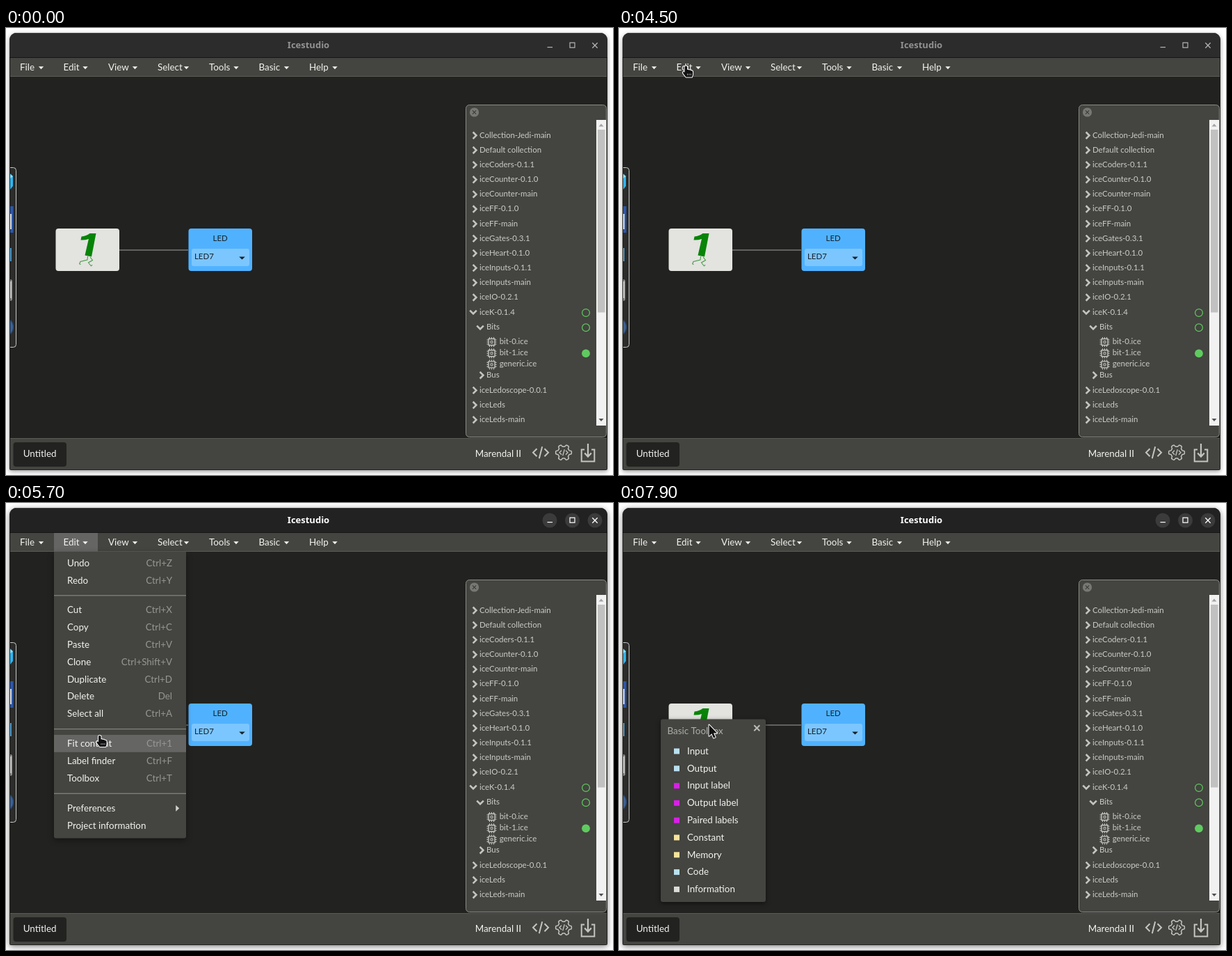
Write an HTML page with a canvas that moves like this. It is 873 px wide and 642 px high and loops after 8 s.

```html
<!DOCTYPE html>
<html lang="en">
<head>
<meta charset="utf-8">
<title>Icestudio</title>
<style>
html, body { margin: 0; width: 100%; height: 100%; overflow: hidden; background: #fff; }
canvas { display: block; }
</style>
</head>
<body>
<canvas id="stage" width="873" height="642"></canvas>
<script>
const ctx = document.getElementById('stage').getContext('2d');
const LOOP = 8000, STEP = 100, ROW = 24.8;
const PANEL = '#444440', DARK = '#222220', HOVER = '#656563', ICON = '#c4c4c0', GREEN = '#5fcb5f';
const FONT = 'Lato, "Open Sans", sans-serif';

// Drawing helpers
function rect(x, y, w, h, fill) {
  ctx.fillStyle = fill;
  ctx.fillRect(x, y, w, h);
}

function round(x, y, w, h, r, fill, stroke) {
  ctx.beginPath();
  ctx.roundRect(x, y, w, h, r);
  if (fill) { ctx.fillStyle = fill; ctx.fill(); }
  if (stroke) { ctx.strokeStyle = stroke; ctx.lineWidth = 1; ctx.stroke(); }
}

function shadowed(color, blur, dy, draw) {
  ctx.save();
  ctx.shadowColor = color;
  ctx.shadowBlur = blur;
  ctx.shadowOffsetY = dy;
  draw();
  ctx.restore();
}

function text(str, x, y, color = '#f2f2f0', size = 13.4, align = 'left') {
  ctx.font = `${size}px ${FONT}`;
  ctx.textAlign = align;
  ctx.fillStyle = color;
  ctx.fillText(str, x, y + size * 0.36);
}

function circle(x, y, r, fill, stroke, width = 1.2) {
  ctx.beginPath();
  ctx.arc(x, y, r, 0, Math.PI * 2);
  if (fill) { ctx.fillStyle = fill; ctx.fill(); }
  if (stroke) { ctx.strokeStyle = stroke; ctx.lineWidth = width; ctx.stroke(); }
}

function path(d, x, y, fill, stroke, width = 1) {
  const p = new Path2D(d);
  ctx.save();
  ctx.translate(x, y);
  ctx.lineWidth = width;
  if (stroke) { ctx.strokeStyle = stroke; ctx.stroke(p); }
  if (fill) { ctx.fillStyle = fill; ctx.fill(p); }
  ctx.restore();
}

const caret = (x, y, color = '#f2f2f0', r = 3.7) =>
  path(`M${-r} -2H${r}L0 2Z`, x, y, color);
const cross = (x, y, r, color, width) =>
  path(`M${-r} ${-r}L${r} ${r}M${r} ${-r}L${-r} ${r}`, x, y, null, color, width);

// Content
const menuBar = [['File', 20, 50.5], ['Edit', 82.5, 114], ['View', 147, 185.5], ['Select', 218, 259.5],
  ['Tools', 292, 331], ['Basic', 363.5, 403.5], ['Help', 436, 473]];

const editGroups = [
  [86, ['Undo|Ctrl+Z', 'Redo|Ctrl+Y']],
  [153.6, ['Cut|Ctrl+X', 'Copy|Ctrl+C', 'Paste|Ctrl+V', 'Clone|Ctrl+Shift+V', 'Duplicate|Ctrl+D',
    'Delete|Del', 'Select all|Ctrl+A']],
  [345.4, ['Fit content|Ctrl+1', 'Label finder|Ctrl+F', 'Toolbox|Ctrl+T']],
  [438, ['Preferences|>', 'Project information|']]
];

const BLUE = '#b9e0ef', PINK = '#d81fe6', YELLOW = '#f8e39b';
const toolItems = [['Input', BLUE], ['Output', BLUE], ['Input label', PINK], ['Output label', PINK],
  ['Paired labels', PINK], ['Constant', YELLOW], ['Memory', YELLOW], ['Code', BLUE], ['Information', '#dcdcd8']];

const folders = ['Collection-Jedi-main', 'Default collection', 'iceCoders-0.1.1', 'iceCounter-0.1.0',
  'iceCounter-main', 'iceFF-0.1.0', 'iceFF-main', 'iceGates-0.3.1', 'iceHeart-0.1.0', 'iceInputs-0.1.1',
  'iceInputs-main', 'iceIO-0.2.1'];

// Pointer: time, x, y
const ARROW = 'M0 0V16.2L3.8 12.7L6.6 19L9.2 17.9L6.5 11.9H11.4Z';
const HAND = 'M-2 1.4Q-2 0 -.2 0Q1.6 0 1.6 1.6V5.4Q3.4 4.8 4.2 6Q6 5.4 6.9 6.7Q9.6 6.3 9.6 8.8V11.5' +
  'Q9.6 13.5 8.4 16H-.2L-4.3 10.6Q-5.2 8.6 -3.4 8.3L-2 9.3Z';
const track = [
  [1200, 268, 1], [1300, 272, 9], [1400, 279, 16], [1500, 286, 21], [1900, 286, 21],
  [2000, 285.5, 21.5], [2300, 285.5, 21.5], [2400, 290, 23], [2500, 282, 41], [2700, 242, 92],
  [2900, 202, 133.5], [3000, 191, 132], [3200, 171.5, 122], [3500, 150, 111], [3800, 122, 91],
  [4100, 102.5, 74.5], [4200, 100, 68], [4300, 98, 60], [4500, 96.5, 54.5], [4900, 96.5, 54.5],
  [5000, 98, 66], [5100, 102, 112], [5200, 107, 164], [5300, 112, 208.5], [5500, 124, 272],
  [5700, 135, 334], [5800, 137, 367], [5900, 139, 383.5], [6100, 142, 402], [6300, 142, 402],
  [6400, 138, 389], [7100, 138, 389], [7200, 139, 393], [7300, 139, 388], [7400, 138, 371],
  [7500, 136, 350], [7600, 133, 326], [7700, 131, 312.5], [7800, 131, 312.5], [7900, 129.5, 318.5]
];

function pointerAt(t) {
  if (t < track[0][0]) return null;
  let i = track.findIndex(k => k[0] > t);
  if (i < 0) i = track.length;
  const a = track[i - 1], b = track[i] || a;
  const f = b === a ? 0 : (t - a[0]) / (b[0] - a[0]);
  return { x: a[1] + (b[1] - a[1]) * f, y: a[2] + (b[2] - a[2]) * f };
}

function drawWindow(focused) {
  rect(0, 0, 873, 642, '#fff');
  shadowed(focused ? 'rgba(0,0,0,.5)' : 'rgba(0,0,0,.4)', focused ? 8 : 6, 2,
    () => round(5, 7, 860, 628, [10, 10, 2, 2], DARK));
  round(5, 7, 860, 36, [10, 10, 0, 0], focused ? '#222222' : '#2c2c2c');
  rect(14, 7, 842, 1, focused ? '#3a3a3a' : '#404040');
  const ink = focused ? '#fff' : '#929292';
  ctx.font = 'bold 13px "Noto Sans", "Open Sans", sans-serif';
  ctx.textAlign = 'center';
  ctx.fillStyle = ink;
  ctx.fillText('Icestudio', 435, 29.3);

  const control = focused ? '#fff' : '#b4b4b4';
  if (focused) [782, 814.5, 847].forEach(x => circle(x, 25, 10.5, '#3b3b3b'));
  rect(778.5, 27, 7.5, 1.2, control);
  path('M-3.5 -3.5H3.5V3.5H-3.5Z', 814.5, 24.7, null, control, 1.2);
  cross(847, 25, 3.7, control, 1.3);

  rect(5, 42, 860, 1, '#171717');
  rect(6, 43, 858, 26, PANEL);
  rect(6, 69, 858, 1, '#5b5b58');
}

function drawMenuBar(open) {
  if (open) rect(69, 43, 63, 27, HOVER);
  for (const [label, x, cx] of menuBar) {
    text(label, x, 56.3);
    caret(cx, 57.3);
  }
}

function drawSideTools() {
  ctx.save();
  ctx.beginPath();
  ctx.rect(6, 195, 12, 270);
  ctx.clip();
  round(-10, 200.5, 24.5, 258, 4, '#2c2c2a', '#c9c9c7');
  path('M0 0L4 4V18L0 23Z', 6, 209, '#2fb4ee');
  path('M0 1L4 4L0 7Z', 6, 209, '#8ee0ff');
  rect(6, 256, 4.5, 38, '#2c56a8');
  rect(6, 267, 1.8, 22, '#f0f4fa');
  rect(6, 316, 1.6, 19, '#5cb8f2');
  round(0, 361, 9, 31, 3, '#8e8e8c');
  rect(6, 364, 1.5, 24, '#e4e4e2');
  circle(-3, 429.5, 13.5, '#3d608f', '#294a76');
  ctx.restore();
}

function drawBlocks() {
  rect(163, 318.2, 99, 1.5, '#777775');
  round(71.5, 288, 91.5, 61, 4, '#e3e3e0');
  path('M0 9.5L1 4.5Q8 3.8 13 0H22L15.5 33.5L6 31.5L11.4 8Q6 10 0 9.5Z', 107.5, 295, '#078407');
  path('M117.5 328L117 333L107 335.5L105.5 339M121 329L124.5 333.5L118.5 337L122.5 342M105.5 339L107.5 339.5M122.5 342L124 340',
    0, 0, null, '#459b45', 1.1);
  round(262.5, 288, 91.5, 61, 4, '#50b2ff');
  text('LED', 308.2, 302.3, '#15202a', 11.45, 'center');
  round(267, 317, 83, 25, 3, '#7cc6ff');
  text('LED7', 271, 328.3, '#15202a', 11.45);
  caret(339.5, 330.6, '#15202a', 4.3);
}

const chevronRight = (x, y) => path('M-2.4 -4.8L2.4 0L-2.4 4.8', x, y, null, ICON, 2.6);
const chevronDown = (x, y) => path('M-4.8 -2.4L0 2.4L4.8 -2.4', x, y, null, ICON, 2.6);

function drawChip(x, y) {
  path('M-4.5 -4.5H4.5V4.5H-4.5Z', x, y, null, ICON, 1.4);
  path('M-1.5 -1.5H1.5V1.5H-1.5Z', x, y, null, ICON, 1);
  for (const k of [-3, 0, 3]) {
    path(`M${k} -7V-5M${k} 5V7M-7 ${k}H-5M5 ${k}H7`, x, y, null, ICON, 1.1);
  }
}

function drawTree() {
  round(661.5, 110.5, 202, 477, 5, PANEL, '#8b8b87');
  circle(673.5, 121, 6.6, '#777773');
  cross(673.5, 121, 2.6, '#3c3c39', 1.2);
  const item = (str, x, y) => text(str, x, y, '#cbcbc7', 11.45);
  const folder = (str, y) => { chevronRight(674, y + 0.7); item(str, 681, y); };

  folders.forEach((name, i) => folder(name, 153.6 + i * 21.15));
  chevronDown(672, 408);
  item('iceK-0.1.4', 681, 407.5);
  chevronDown(682, 430);
  item('Bits', 691, 428.5);
  ['bit-0.ice', 'bit-1.ice', 'generic.ice'].forEach((name, i) => {
    drawChip(698.5, 451 + i * 16.2);
    item(name, 709.7, 449.5 + i * 16.2);
  });
  chevronRight(684, 498.7);
  item('Bus', 691, 498.2);
  ['iceLedoscope-0.0.1', 'iceLeds', 'iceLeds-main'].forEach((name, i) => folder(name, 519.7 + i * 21.15));

  circle(834, 409, 5.4, null, GREEN);
  circle(834, 430.3, 5.4, null, GREEN);
  circle(834, 467.3, 5.9, GREEN);

  rect(849, 132, 14, 439, '#f1f1f1');
  rect(851, 146, 10.5, 262.5, '#c1c1c1');
  path('M-3.5 2H3.5L0 -2Z', 856, 139.5, '#a3a3a3');
  caret(856, 563, '#505050', 3.5);
}

function drawFooter() {
  rect(6, 589, 858, 45, PANEL);
  rect(6, 589, 858, 1, '#5b5b58');
  round(10.5, 595, 76.5, 35, 4, DARK);
  text('Untitled', 24.7, 611.5);
  text('Marendal II', 741, 611.5, '#f2f2f0', 13.4, 'right');

  path('M-5.5 -5.5L-11 0L-5.5 5.5M5.5 -5.5L11 0L5.5 5.5M2.2 -8.5L-2.2 8.5', 769, 609.7, null, ICON, 2);
  ctx.beginPath();
  for (let i = 0; i <= 96; i++) {
    const a = i / 96 * Math.PI * 2;
    const r = 9.9 + 1.5 * Math.tanh(3 * Math.cos(6 * a));
    ctx.lineTo(802 + r * Math.cos(a), 609.7 + r * Math.sin(a));
  }
  ctx.strokeStyle = ICON;
  ctx.lineWidth = 1.5;
  ctx.stroke();
  path('M-3 -3L-6 0L-3 3M3 -3L6 0L3 3M1.3 -4.5L-1.3 4.5', 802, 609.7, null, ICON, 1.3);
  path('M-5 -4.5H-9.3V12.5H9.3V-4.5H5', 837, 610, null, ICON, 2);
  path('M0 -13V5M-4.8 .5L0 5.6L4.8 .5', 837, 610, null, ICON, 2.2);
}

const over = (p, y) => p && Math.abs(p.y - y) < ROW / 2;

function drawEditMenu(p) {
  shadowed('rgba(0,0,0,.4)', 8, 3, () => round(69, 70, 190, 411.5, [0, 0, 3, 3], PANEL));
  for (const [top, items] of editGroups) {
    if (top > 100) rect(69, top - 21.3, 190, 1.1, '#8b8b87');
    items.forEach((entry, i) => {
      const [label, key] = entry.split('|'), y = top + i * ROW;
      if (over(p, y)) rect(69, y - ROW / 2, 190, ROW, HOVER);
      text(label, 88, y);
      if (key === '>') path('M-2.3 -4.5L2.7 0L-2.3 4.5Z', 246.5, y + 0.5, '#cfcfcb');
      else text(key, 239, y, '#969692', 13.4, 'right');
    });
  }
}

function drawToolbox(p) {
  shadowed('rgba(0,0,0,.5)', 6, 2, () => round(60, 310.5, 151, 262.5, 3, PANEL));
  text('Basic Toolbox', 69.5, 327.5, '#adada9');
  cross(198.3, 323.3, 4, '#b9b9b5', 2);
  toolItems.forEach(([label, color], i) => {
    const y = 356 + i * ROW;
    if (over(p, y)) rect(60, y - ROW / 2, 151, ROW, HOVER);
    rect(79, y - 3.5, 8, 8, color);
    text(label, 98, y);
  });
}

function drawPointer(p, t) {
  const hand = t >= 4200 && t < 7600;
  ctx.lineJoin = 'round';
  path(hand ? HAND : ARROW, p.x, p.y, '#111', '#fff', 2);
  if (hand) path('M2 11V13.5M4.4 11V13.5M6.8 11V13.5', p.x, p.y, null, '#ddd', 0.7);
  ctx.lineJoin = 'miter';
}

function draw(t) {
  const p = pointerAt(t);
  const menuOpen = t >= 4600 && t < 6800;
  drawWindow(t >= 4600);
  drawMenuBar(menuOpen);
  drawSideTools();
  drawBlocks();
  drawTree();
  drawFooter();
  if (menuOpen) drawEditMenu(p);
  if (t >= 6800) drawToolbox(p);
  if (p) drawPointer(p, t);
}

const start = performance.now();
let shown = -1;

function tick() {
  const t = Math.floor(((performance.now() - start) % LOOP) / STEP) * STEP;
  if (t !== shown) draw(shown = t);
  requestAnimationFrame(tick);
}
tick();
</script>
</body>
</html>
```
